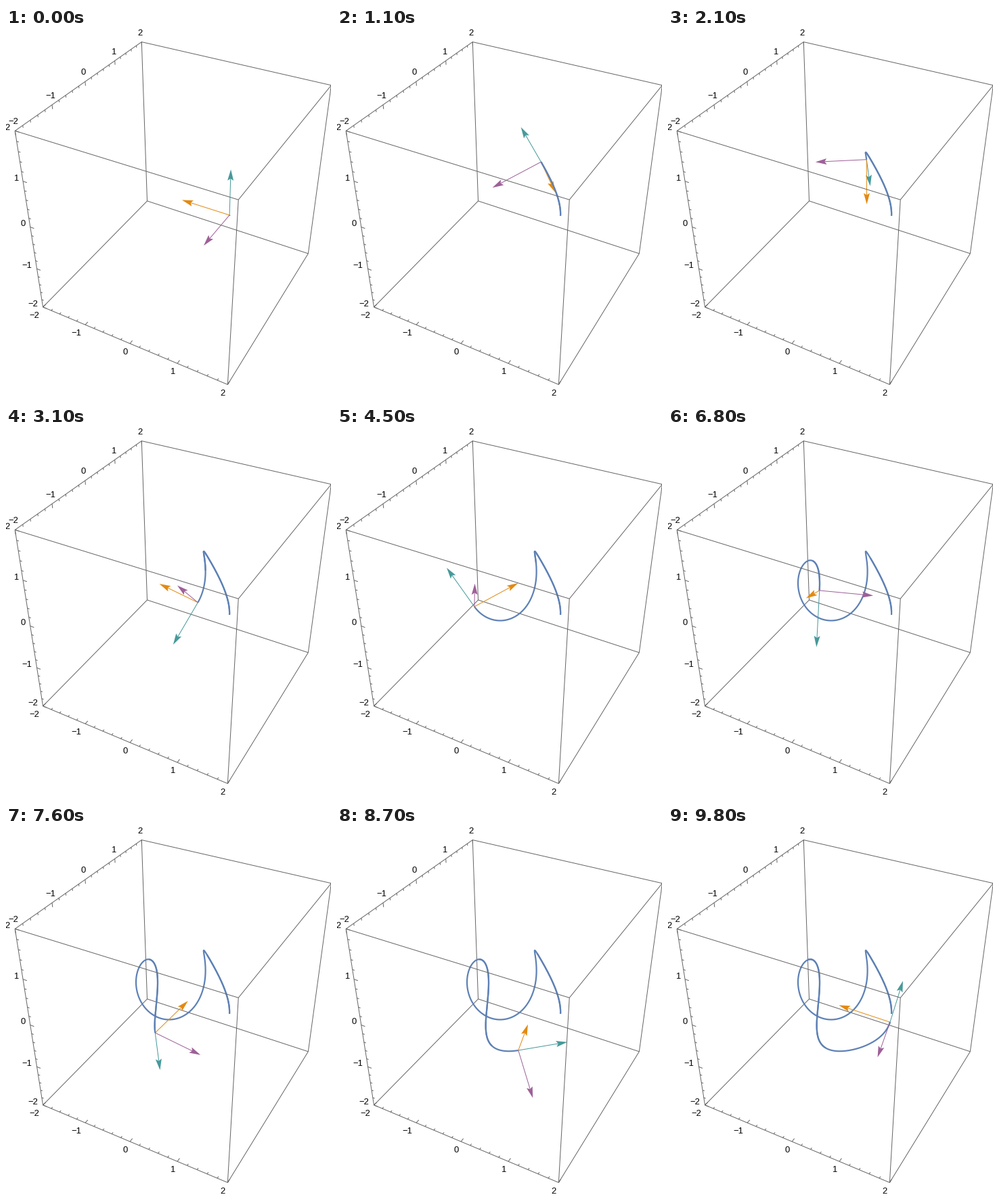
Write a matplotlib script that moves like this. It is 480 px wide and 549 px high and loops after 9.9 s.

```python
import itertools

import matplotlib.pyplot as plt
import numpy as np
from matplotlib.animation import FuncAnimation

W, H, DPI = 480, 549, 100
FRAMES, INTERVAL = 99, 100
START, STEP = 0.01, 2 * np.pi / 100
PX = 72 / DPI  # one pixel in points

INK = "#666666"
BLUE = "#5e81b5"
TEAL, ORANGE, PURPLE = "#47999a", "#e28a12", "#9e6098"

# The box spans -R..R on each axis; the eye looks at its centre.
R = 2
EYE = 2 * R * np.array([1.3, -2.4, 2.0])
SCALE = 78.4  # pixels per unit at the centre
CX, CY = 258.6, 254.8

DISTANCE = np.linalg.norm(EYE)
TOWARD = EYE / DISTANCE
RIGHT = np.cross([0, 0, 1], TOWARD)
RIGHT /= np.linalg.norm(RIGHT)
UP = np.cross(TOWARD, RIGHT)


def project(p):
    """Screen x, screen y and relative depth of points (..., 3)."""
    p = np.asarray(p, float)
    depth = 1 - p @ TOWARD / DISTANCE
    return CX + SCALE * (p @ RIGHT) / depth, CY - SCALE * (p @ UP) / depth, depth


def curve(t):
    """Closed curve on the unit sphere, an astroid seen from above."""
    return np.stack([np.cos(t) ** 3, np.sin(t) ** 3,
                     np.sqrt(3) / 2 * np.sin(2 * t)], axis=-1)


def frenet(t):
    """Unit tangent, normal and binormal of the curve."""
    c, s = np.cos(t), np.sin(t)
    d1 = np.array([-3 * c * c * s, 3 * s * s * c, np.sqrt(3) * np.cos(2 * t)])
    d2 = np.array([6 * c * s * s - 3 * c ** 3, 6 * s * c * c - 3 * s ** 3,
                   -2 * np.sqrt(3) * np.sin(2 * t)])
    tangent = d1 / np.linalg.norm(d1)
    binormal = np.cross(d1, d2)
    binormal /= np.linalg.norm(binormal)
    return tangent, np.cross(binormal, tangent), binormal


fig = plt.figure(figsize=(W / DPI, H / DPI), dpi=DPI, facecolor="white")
ax = fig.add_axes([0, 0, 1, 1])
ax.set_xlim(-0.5, W - 0.5)
ax.set_ylim(H - 0.5, -0.5)
ax.axis("off")


def stroke(xs, ys, color=INK, width=1.0, z=1):
    return ax.plot(xs, ys, color=color, lw=width * PX, zorder=z,
                   solid_capstyle="butt", solid_joinstyle="round")[0]


def draw_box():
    corners = list(itertools.product((-R, R), repeat=3))
    farthest = max(corners, key=lambda p: project(p)[2])
    for a, b in itertools.combinations(corners, 2):
        if sum(i != j for i, j in zip(a, b)) == 1:
            x, y, _ = project([a, b])
            stroke(x, y, z=1 if farthest in (a, b) else 8)


def draw_scale(axis, base, inward, dx, dy, pull):
    """Ticks and labels on a box edge; pull moves longer labels further left."""
    for k in range(-5 * R, 5 * R + 1):
        p = np.array(base, float)
        p[axis] = k / 5
        major = k % 5 == 0
        size = 0.085 if major else 0.045
        x, y, _ = project([p, p + size * np.array(inward)])
        stroke(x, y, z=8)
        if major:
            label = str(k // 5).replace("-", "\u2212")
            ax.text(x[0] + dx - pull * 7.4 * len(label), y[0] + dy, label,
                    fontsize=13 * PX, family="Liberation Sans", color="black",
                    ha="center", va="center_baseline", zorder=9)


draw_box()
draw_scale(0, (0, -R, -R), (0, 1, 0), -1.8, 11.5, 0.75)
draw_scale(1, (-R, 0, R), (0, 0, -1), -2.4, -14.3, 0)
draw_scale(2, (-R, -R, 0), (1, 0, 0), -7.2, -5.7, 0.5)


class Arrow:
    """Thin shaft with a barbed head of fixed screen size."""

    HEAD = np.array([(0, 0), (-16.5, 4.5), (-13.6, 0), (-16.5, -4.5)])

    def __init__(self, color):
        self.shaft = stroke([], [], color, 1.0, z=4)
        self.head = plt.Polygon(np.zeros((4, 2)), fc=color, ec="none", zorder=4)
        ax.add_patch(self.head)

    def point(self, start, end):
        x, y, _ = project([start, end])
        tip = np.array([x[1], y[1]])
        d = tip - (x[0], y[0])
        d /= np.hypot(*d)
        outline = tip + self.HEAD @ np.array([d, (-d[1], d[0])])
        self.head.set_xy(outline)
        self.shaft.set_data([x[0], outline[2, 0]], [y[0], outline[2, 1]])


far_trail = stroke([], [], BLUE, 2.2, z=3)
near_trail = stroke([], [], BLUE, 2.2, z=5)
arrows = [Arrow(c) for c in (TEAL, ORANGE, PURPLE)]


def update(i):
    t = START + i * STEP
    pos = curve(t)
    axes = frenet(t)
    for arrow, direction in zip(arrows, axes):
        arrow.point(pos, pos + direction)

    x, y, depth = project(curve(np.linspace(0, t, 400)))
    far_trail.set_data(x, y)
    # The part nearer than the normal arrow lies over the arrows.
    middle = project(pos + axes[1] / 2)[2]
    near_trail.set_data(np.where(depth < middle, x, np.nan), y)
    return []


anim = FuncAnimation(fig, update, frames=FRAMES, interval=INTERVAL,
                     init_func=lambda: update(0), repeat=True, repeat_delay=0)
plt.show()
```
